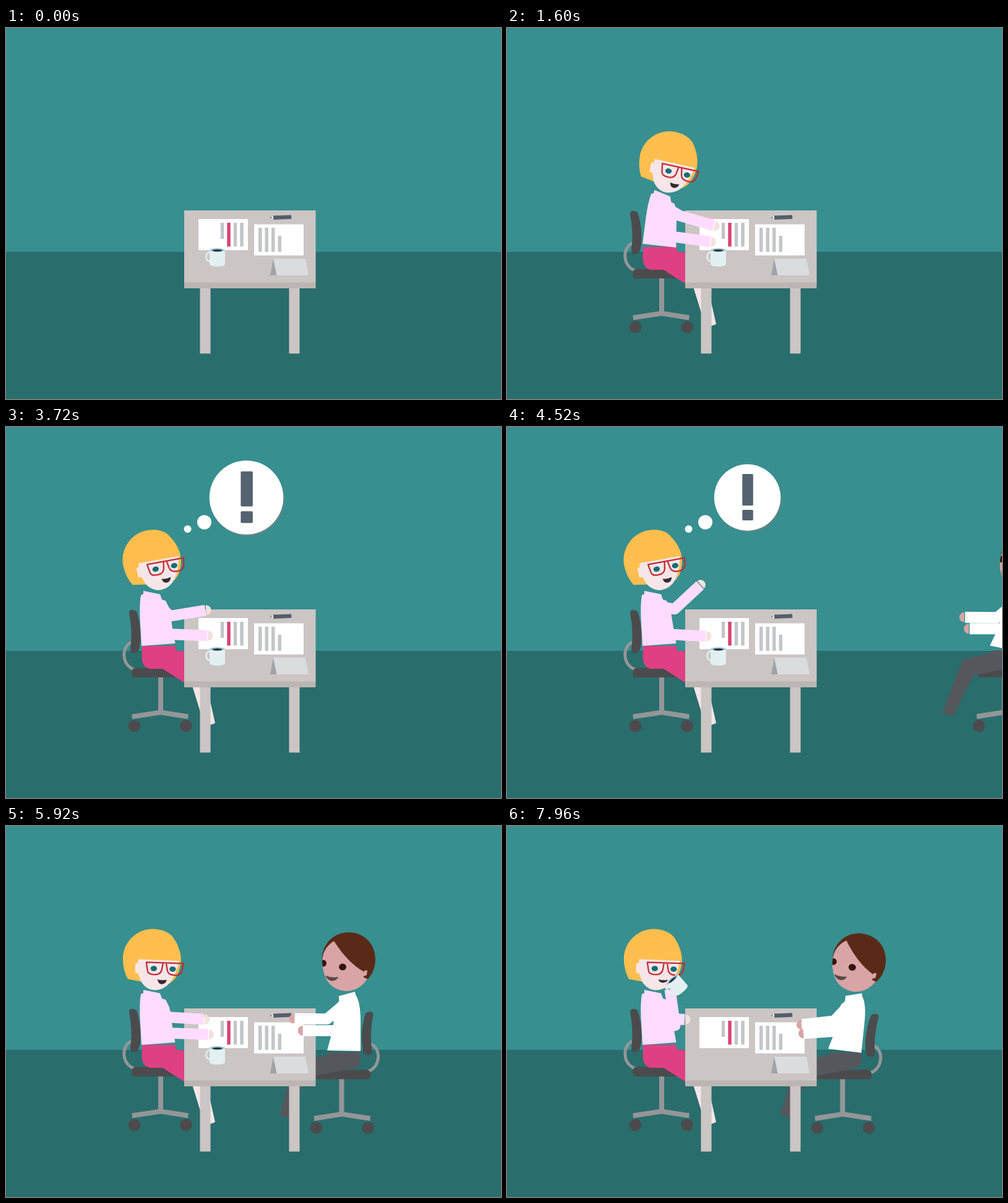
An HTML page with a canvas for the animation above (8 s loop, 800x600 px).

```html
<!DOCTYPE html>
<html lang="en">
<head>
<meta charset="utf-8">
<title>Desk meeting</title>
<style>
html, body { margin: 0; width: 100%; height: 100%; overflow: hidden; background: #378f8f; }
canvas { display: block; width: 800px; height: 600px; }
</style>
</head>
<body>
<canvas id="stage" width="800" height="600"></canvas>
<script>
const ctx = document.getElementById('stage').getContext('2d');
const LOOP = 8000;
const RAD = Math.PI / 180;

const lerp = (a, b, u) => a + (b - a) * u;
const span = (t, a, b) => Math.max(0, Math.min(1, (t - a) / (b - a)));
const sine = u => (1 - Math.cos(Math.PI * u)) / 2;
const backIn = u => u * u * (3.6 * u - 2.6);
const backOut = u => 1 - backIn(1 - u);
function ease(t, a, b) {
  const u = span(t, a, b);
  return u * u * (3 - 2 * u);
}

function shape(d, color) {
  ctx.fillStyle = color;
  ctx.fill(new Path2D(d));
}
function line(d, color, width) {
  ctx.strokeStyle = color;
  ctx.lineWidth = width;
  ctx.lineJoin = 'round';
  ctx.stroke(new Path2D(d));
}
function rect(x, y, w, h, color) {
  ctx.fillStyle = color;
  ctx.fillRect(x, y, w, h);
}
function oval(x, y, rx, ry, color) {
  ctx.fillStyle = color;
  ctx.beginPath();
  ctx.ellipse(x, y, rx, ry, 0, 0, 2 * Math.PI);
  ctx.fill();
}
const disc = (x, y, r, color) => oval(x, y, r, r, color);

function group(draw) {
  ctx.save();
  draw();
  ctx.restore();
}
function spin(x, y, deg) {
  ctx.translate(x, y);
  ctx.rotate(deg * RAD);
  ctx.translate(-x, -y);
}
function rotated([x, y], [cx, cy], deg) {
  const s = Math.sin(deg * RAD), c = Math.cos(deg * RAD);
  return [cx + (x - cx) * c - (y - cy) * s, cy + (x - cx) * s + (y - cy) * c];
}
const polar = ([x, y], deg, r) => [x + r * Math.cos(deg * RAD), y + r * Math.sin(deg * RAD)];

// A reach is [angle, distance, elbow bend] as seen from the shoulder.
function arm(shoulder, [angle, reach, bend], upper, sleeve, skin) {
  const elbow = polar(shoulder, angle + bend, upper);
  const hand = polar(shoulder, angle, reach);
  const dir = Math.atan2(hand[1] - elbow[1], hand[0] - elbow[0]);
  ctx.strokeStyle = sleeve;
  ctx.lineWidth = 17.8;
  ctx.lineJoin = 'round';
  ctx.beginPath();
  ctx.moveTo(...shoulder);
  ctx.lineTo(...elbow);
  ctx.lineTo(...hand);
  ctx.stroke();
  const [x, y] = polar(hand, dir / RAD, 1.3);
  ctx.fillStyle = skin;
  ctx.beginPath();
  ctx.arc(x, y, 8, dir - Math.PI / 2, dir + Math.PI / 2);
  ctx.fill();
  return hand;
}

function room() {
  rect(0, 0, 800, 362, '#378f8f');
  rect(0, 362, 800, 238, '#2a6d6d');
}

function chair(tilt) {
  group(() => {
    spin(247, 400, tilt);
    line('M203 348 C186 354 186 386 208 392.5', '#949698', 5);
    shape('M199 301 Q199 295 206 296 L211 298 Q218 318 217.5 342 Q217 357 213 364 Q208 367 202 365 Q200 359 202 350 Q204 328 199 301Z', '#4b4b4d');
  });
  rect(246, 404, 8, 58, '#949698');
  shape('M203.5 464.5 L250 457.5 L295 464.5 L294 472.5 L250 465.5 L204 472.5Z', '#949698');
  for (const x of [207.5, 291]) disc(x, 483.5, 9.8, '#4b4b4d');
  shape('M210 389.5 L292 391 L292 405 L208 405 Q203 405 203 398 Q203 390 210 389.5Z', '#4b4b4d');
}

function sheet(x, y, bars, top, bottom, cut) {
  rect(x, y, 80, 50.3, '#fff');
  for (let i = 0; i < 4; i++) {
    const [from, to, color] = cut(i);
    rect(bars + i * 10.5, from ?? top, 5.5, (to ?? bottom) - (from ?? top), color ?? '#c3c5c9');
  }
}

function desk() {
  for (const x of [313.5, 457.5]) rect(x, 420, 17, 106.5, '#cbc5c4');
  rect(288, 295, 212.5, 117, '#cbc5c3');
  rect(288, 411.5, 212.5, 9.5, '#bcb5b1');

  sheet(311, 309, 346.8, 315, 353.5, i => [, i === 0 ? 341 : undefined, i === 1 ? '#db4373' : undefined]);
  sheet(401, 317.5, 408, 323, 362, i => [i === 3 ? 336 : undefined]);

  shape('M427 306.5 L432 303.5 L432.3 310Z', '#e0dad6');
  shape('M426.8 306.6 L429 305.3 L429 307.9Z', '#545e6c');
  shape('M432 303.4 L461 302.4 L461.3 308.8 L432.3 310Z', '#545e6c');

  shape('M432 373 L427 400 L438 400Z', '#a0a3a8');
  shape('M432 373 L484 373 L489 400 L437.5 400Z', '#d9dddd');
}

function mug(x, y, deg) {
  group(() => {
    ctx.translate(x, y);
    ctx.rotate(deg * RAD);
    ctx.strokeStyle = '#e3f0f2';
    ctx.lineWidth = 2.6;
    ctx.beginPath();
    ctx.ellipse(-12, -1, 6, 7.5, 0, 0, 2 * Math.PI);
    ctx.stroke();
    shape('M-12.5 -12 L12.5 -12 L12.5 11 Q12 14.7 0 14.7 Q-12 14.7 -12.5 11Z', '#e3f0f2');
    oval(0, -12, 12.5, 3, '#a9cbd6');
    oval(0, -11.3, 8, 1.7, '#263640');
  });
}

const HIP = [246, 352];
const SKIN = '#f7e6e8';
const PINK = '#ffdcff';

function womanLegs() {
  shape('M299 412 L323 412 L338 479 L321.5 485Z', '#f3e6e6');
  chair(0);
  shape('M220 354 L273 354 L276 362 L304 364 Q318 368 320 382 L325 421 L300 421 L253 391 L232 391 Q219 388 219.5 370Z', '#df4084');
}

function womanHead(tilt, open) {
  ctx.translate(0.8, 0.4);
  spin(236, 216, tilt);
  shape('M196 247 Q188 232 188 214 C188 188 210 166 236 166 C250 166 262 171 268 178 C276 188 282 203 282 216 Q282 232 272 247 L264 254 L217 251Z', '#ffbe4e');
  shape('M213 215 L279 217.5 Q275 238 264 253 Q254 265 239 265 Q225 264 217 250 L213 238 L208 237 L208 222 L212 221Z', SKIN);
  for (const x of [238, 268.5]) oval(x, 223 + x * 0.03, 5.2, 4.2, '#136c76');
  const lip = 248 + 7 * open;
  shape(`M244 247.5 Q251 250 259 248 Q257.5 ${lip} 251 ${lip + 0.5} Q245 ${lip} 244 247.5Z`, '#352b2e');
  line('M253 221 L251 232 Q249 240 240 240 Q229 240 228 234 L226 220 L286 222 L284 233 Q282 241 273 241 Q262 241 260 234 L258 221', '#c02b35', 2.3);
}

// Each pose holds the reach of the far arm and of the near arm.
const POSES = {
  write: [[20, 79, 10], [20, 77, 36]],
  rest: [[17, 74, 38], [14, 79, 36]],
  wave: [[-29, 72, 38], [16, 74, 36]],
  reach: [[17, 60, 50], [35, 83, -40]],
  sip: [[30, 44, 38], [-76, 55.5, 88]]
};
const MOVES = [
  [2600, 3100, 'rest'],
  [3600, 3950, 'wave'],
  [5000, 5400, 'rest'],
  [6400, 7000, 'reach'],
  [7120, 7760, 'sip']
];

function womanReach(t) {
  let pose = POSES.write;
  for (const [start, end, name] of MOVES) {
    const u = ease(t, start, end);
    pose = pose.map((reach, i) => reach.map((v, k) => lerp(v, POSES[name][i][k], u)));
  }
  const busy = span(t, 1040, 1150) * (1 - span(t, 2480, 2600));
  pose[0][0] += 1.5 * busy * Math.sin((t - 1600) / 130);
  return pose;
}

function womanTop(t) {
  const lean = 10.5 * (1 - ease(t, 2700, 3300));
  const tilt = -12.4 * (ease(t, 3300, 3700) - ease(t, 5000, 5450));
  group(() => {
    spin(...HIP, lean);
    shape('M222 265 L249 270.5 L252 279 L258 281 L264 293 L269 325 L273.5 350 L219 354 L216.5 310 Q215.5 285 218 272 L222 270Z', PINK);
    womanHead(tilt, 1 - 0.35 * ease(t, 6600, 7000));
  });
  const [far, near] = womanReach(t);
  arm(rotated([249, 291], HIP, lean), far, 22, PINK, '#f3e1de');
  return arm(rotated([250, 318], HIP, lean), near, 22, PINK, '#f3e1de');
}

const MAN_HIP = [546, 362];
const MAN_SKIN = '#d9a4a5';

function manLegs(lean, seated) {
  group(() => {
    ctx.translate(792.4, 4.5);
    ctx.scale(-1, 1);
    chair(-lean * 0.7);
  });
  const knee = -9 * seated;
  shape(`M573 366 L525 366 Q518 371 503 374 L${475 + knee} 381 L442 467 L460 473 L${492 + knee} 407 L552 394 Q574 392 573 378Z`, '#54585d');
}

function manTop(lean, relax) {
  group(() => {
    spin(...MAN_HIP, lean);
    shape('M538 275 L564 268 L565 273 Q573 285 573 315 L573 364 L519 363 L528 330 L532 290 L538 284Z', '#fff');
    const face = new Path2D('M511 222 C511 196 528 175 552 175 C578 175 592 195 592 218 Q592 238 584 247 Q571 267 549 267 Q514 264 511 222Z');
    ctx.fillStyle = MAN_SKIN;
    ctx.fill(face);
    group(() => {
      ctx.clip(face);
      oval(513, 222, 5, 5.4, '#35150f');
    });
    oval(544, 228, 6, 5.4, '#35150f');
    shape('M516 242 Q527 246 537 244 Q534 251 526 250.5 Q519 249 516 242Z', '#5a484a');
    shape('M510.5 219 Q512 197 530 186 Q553 222 579 236 L579 233.5 L584 233.5 L583 241 L578 243 L578 245 L585 247.5 Q597 234 597 216 C597 190 578 172 554 172 C530 172 510 190 510.5 219Z', '#5a2918');
  });
  arm(rotated([543, 331], MAN_HIP, lean), [180 - 4 * relax, 62 + 4 * relax, 0], 15, '#fff', MAN_SKIN);
  arm(rotated([544, 291], MAN_HIP, lean), [165 - 7 * relax, 80, -25], 33, '#fff', MAN_SKIN);
}

function bubble(t) {
  const leave = 1 - backIn(span(t, 4910, 5310));
  const pop = (start, x, y, draw) => group(() => {
    const s = Math.max(0, backOut(span(t, start, start + 400)) * leave);
    ctx.translate(x, y);
    ctx.scale(s, s);
    draw();
  });
  pop(3080, 293.5, 165, () => disc(0, 0, 6, '#fff'));
  pop(3260, 320.5, 154, () => disc(0, 0, 11.5, '#fff'));
  pop(3580, 388.5, 114, () => {
    disc(1.2, 2, 53.7, '#6b8588');
    disc(0, 0, 53.7, '#fff');
    ctx.fillStyle = '#556270';
    ctx.beginPath();
    ctx.roundRect(-8.2, -38, 17.5, 51, 1.5);
    ctx.roundRect(-8.2, 20, 17.5, 17, 1.5);
    ctx.fill();
  });
}

function render(t) {
  const womanOff = -350 * (1 - sine(span(t, 200, 1020)));
  const manOff = 400 * (1 - sine(span(t, 4080, 5180)));
  const settle = ease(t, 4520, 5180), relax = ease(t, 7080, 7720);
  const lean = 10 * (1 - settle) + 0.5 * ease(t, 6200, 7080) + 5.5 * relax;
  const slide = (off, drop, draw) => group(() => {
    ctx.translate(off, -off * drop);
    draw();
  });
  const woman = draw => { if (t >= 240) slide(womanOff, 0.008, draw); };
  const man = draw => { if (t >= 4080) slide(manOff, 0.018, draw); };

  room();
  woman(womanLegs);
  man(() => manLegs(lean, settle));
  desk();
  man(() => manTop(lean, relax));

  let hand;
  woman(() => { hand = womanTop(t); });
  if (t < 7120) {
    mug(341.5, 371, 0);
  } else {
    const k = ease(t, 7120, 7760);
    const [dx, dy] = rotated([lerp(23.5, 13.3, k), lerp(5.4, 2.3, k)], [0, 0], -41 * k);
    mug(hand[0] + dx, hand[1] + dy, -41 * k);
  }
  bubble(t);
}

const begin = performance.now();
function tick() {
  render((performance.now() - begin) % LOOP);
  requestAnimationFrame(tick);
}
tick();
</script>
</body>
</html>
```
